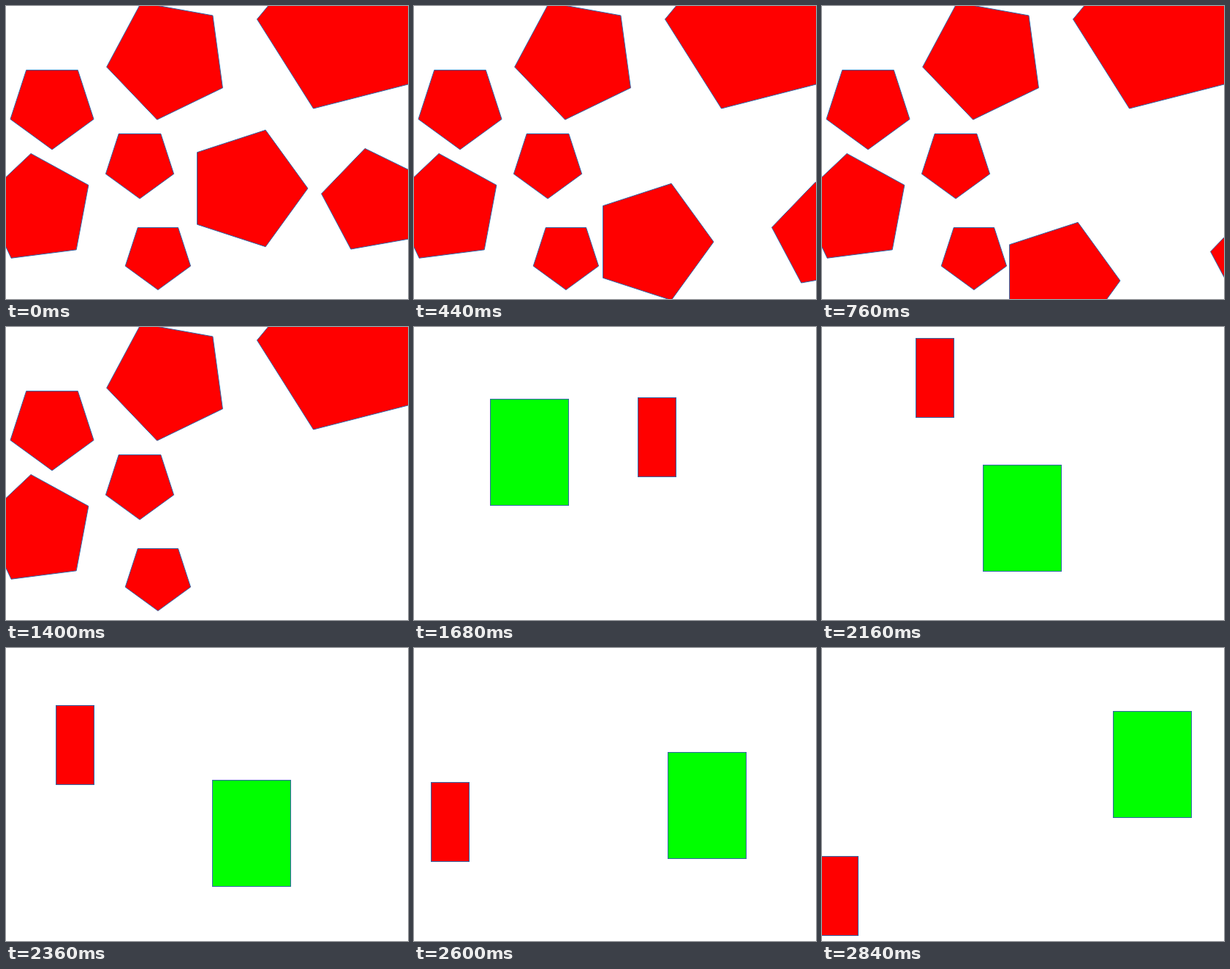
Recreate the animation shown at these times as an HTML page with a canvas. Size 550 by 400 pixels, loop 2.88 s.

```html
<!DOCTYPE html>
<html lang="en">
<head>
<meta charset="utf-8">
<title>Moving shapes</title>
<style>
  html, body { margin: 0; width: 100%; height: 100%; overflow: hidden; background: #fff; }
  canvas { display: block; width: 550px; height: 400px; }
</style>
</head>
<body>
<canvas id="stage" width="550" height="400"></canvas>
<script>
const ctx = document.getElementById('stage').getContext('2d');
const STEP = 40, STEPS = 72, CUT = 39, DRIFT_END = 35;
const RED = '#ff0000', GREEN = '#00ff00', LINE = '#2f66a8';

// Regular pentagons: centre, radius, turn in degrees, drift per step
const pentagons = [
  { x: 63, y: 136, r: 60, turn: 90 },
  { x: 183, y: 214.1, r: 49, turn: 90 },
  { x: 207.9, y: 340.5, r: 47, turn: 90 },
  { x: 43.8, y: 277.2, r: 76.4, turn: 46.7 },
  { x: 221.7, y: 71.7, r: 84.8, turn: 28.2 },
  { x: 465.9, y: 26, r: 122.7, turn: 39.7 },
  { x: 329.25, y: 249, r: 83.75, turn: 0, drift: [-0.265, 6.63] },
  { x: 503.8, y: 266.4, r: 73, turn: 44, drift: [5.28, 4.17] }
];

// Curved paths through key points evenly spaced in time
const boxes = [
  { w: 107, h: 145, fill: GREEN,
    xs: [85, 139.5, 232.5, 328, 398], ys: [62, 152.5, 189, 157, 86] },
  { w: 52, h: 108, fill: RED,
    xs: [336, 249, 113, 35, -3], ys: [147, 24, 22, 150, 284] }
];

// Catmull-Rom curve, s from 0 to 1
function curve(keys, s) {
  const last = keys.length - 1;
  const i = Math.min(Math.floor(s * last), last - 1);
  const u = s * last - i, v = 1 - u;
  const slope = j => {
    const a = Math.max(j - 1, 0), b = Math.min(j + 1, last);
    return (keys[b] - keys[a]) / (b - a);
  };
  return v * v * (1 + 2 * u) * keys[i] + u * u * (3 - 2 * u) * keys[i + 1]
    + u * v * (v * slope(i) - u * slope(i + 1));
}

function pentagon({ x, y, r, turn, drift = [0, 0] }, n) {
  const cx = x + Math.round(drift[0] * n);
  const cy = y + Math.round(drift[1] * n);
  ctx.beginPath();
  for (let i = 0; i < 5; i++) {
    const a = (turn + i * 72) * Math.PI / 180;
    ctx.lineTo(cx + r * Math.cos(a), cy + r * Math.sin(a));
  }
  ctx.closePath();
  ctx.fillStyle = RED;
  ctx.fill();
  ctx.stroke();
}

function box({ w, h, fill, xs, ys }, s) {
  const x = Math.round(curve(xs, s)) + 0.5;
  const y = Math.round(curve(ys, s)) + 0.5;
  ctx.fillStyle = fill;
  ctx.fillRect(x, y, w, h);
  ctx.strokeRect(x, y, w, h);
}

function draw(n) {
  ctx.fillStyle = '#fff';
  ctx.fillRect(0, 0, 550, 400);
  ctx.strokeStyle = LINE;
  ctx.lineWidth = 1;
  if (n < CUT) {
    pentagons
      .filter(p => !p.drift || n < DRIFT_END)
      .forEach(p => pentagon(p, n));
  } else {
    const s = (n - CUT) / (STEPS - 1 - CUT);
    boxes.forEach(b => box(b, s));
  }
}

const start = performance.now();
function tick() {
  const time = Math.max(0, performance.now() - start);
  draw(Math.floor(time / STEP) % STEPS);
  requestAnimationFrame(tick);
}
tick();
</script>
</body>
</html>
```
